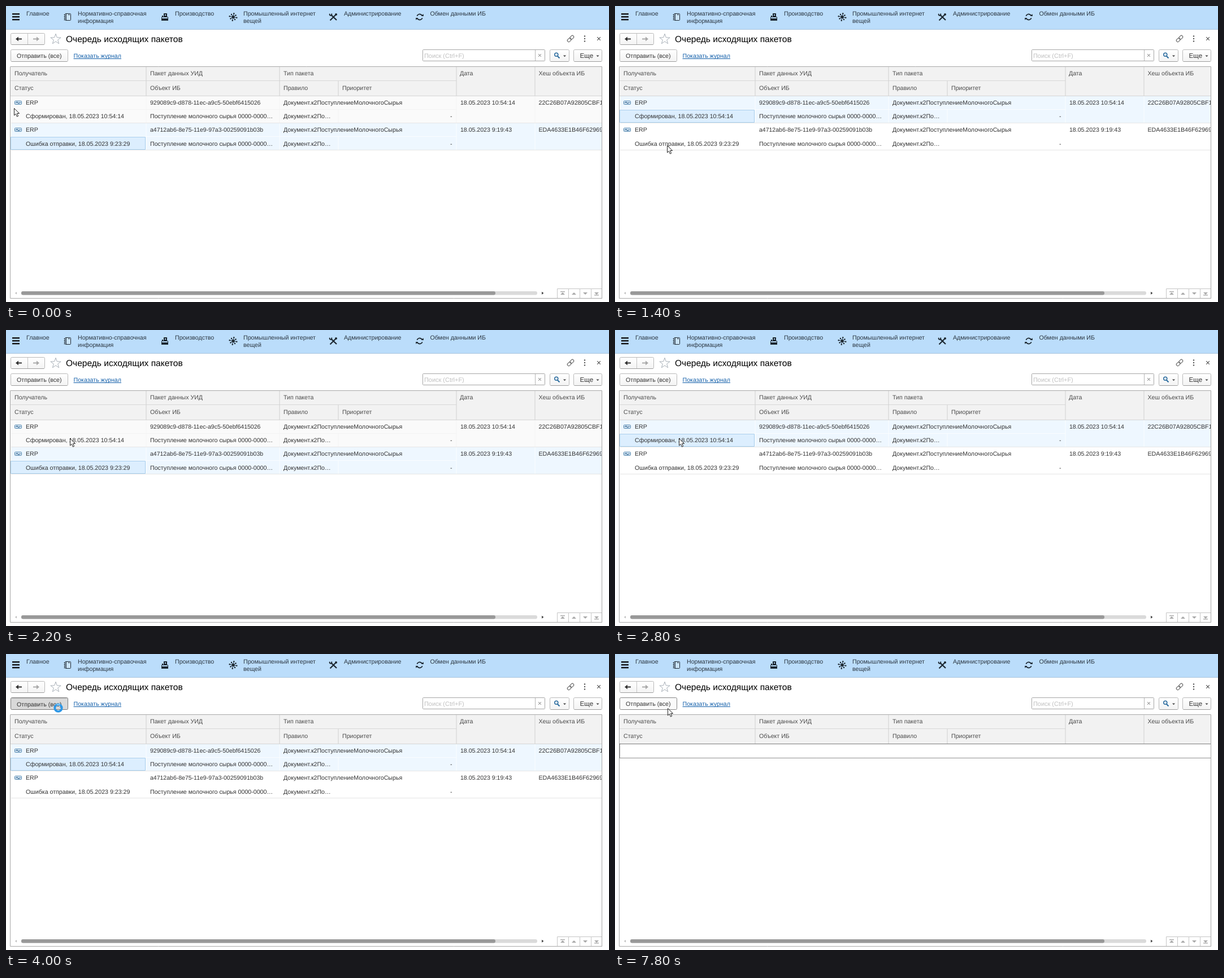
Recreate the animation shown at these times as an HTML page with a canvas. Size 1067 px wide and 525 px high, loop 8 s.

```html
<!DOCTYPE html>
<html lang="ru">
<head>
<meta charset="utf-8">
<style>
html, body { margin: 0; width: 100%; height: 100%; overflow: hidden; background: #fff; }
canvas { display: block; }
</style>
</head>
<body>
<canvas id="stage" width="1067" height="525"></canvas>
<script>
const ctx = document.getElementById('stage').getContext('2d');
const LOOP = 8000;
const SIZE = 10.63;

// time, pointer x, pointer y, selected row, button state, pointer kind, rows left
const steps = [
  [0, 14, 181, 1, 'idle', 'arrow', 2],
  [200, 20, 182, 1, 'idle', 'arrow', 2],
  [400, 48, 186, 1, 'idle', 'arrow', 2],
  [600, 51, 190, 1, 'idle', 'arrow', 2],
  [800, 51, 190, 0, 'idle', 'arrow', 2],
  [1000, 87, 242, 0, 'idle', 'arrow', 2],
  [1200, 92, 252, 0, 'idle', 'arrow', 2],
  [1400, 92, 247, 0, 'idle', 'arrow', 2],
  [1600, 92, 247, 1, 'idle', 'arrow', 2],
  [2200, 113, 192, 1, 'idle', 'arrow', 2],
  [2800, 113, 192, 0, 'idle', 'arrow', 2],
  [3200, 102, 126, 0, 'idle', 'arrow', 2],
  [3400, 93, 102, 0, 'idle', 'arrow', 2],
  [3600, 93, 97, 0, 'hover', 'arrow', 2],
  [3800, 93, 96, 0, 'pressed', 'arrow', 2],
  [4000, 92.5, 95.7, 0, 'pressed', 'busy', 2],
  [7600, 92.5, 95.7, -1, 'hover', 'busy', 1],
  [7800, 93, 96, -1, 'hover', 'arrow', 0]
];

const rows = [
  { id: '929089c9-d878-11ec-a9c5-50ebf6415026', date: '18.05.2023 10:54:14',
    hash: '22C26B07A92805CBF1', status: 'Сформирован, 18.05.2023 10:54:14' },
  { id: 'a4712ab6-8e75-11e9-97a3-00259091b03b', date: '18.05.2023 9:19:43',
    hash: 'EDA4633E1B46F62969', status: 'Ошибка отправки, 18.05.2023 9:23:29' }
];

function text(str, x, midY, color = '#333', size = SIZE) {
  ctx.font = `${size}px "Liberation Sans", Arial, sans-serif`;
  ctx.fillStyle = color;
  ctx.fillText(str, x, midY + size * 0.36);
}

function rect(x, y, w, h, color) {
  ctx.fillStyle = color;
  ctx.fillRect(x, y, w, h);
}

function path(points, color, width = 1, closed = false) {
  ctx.beginPath();
  points.forEach(([x, y]) => ctx.lineTo(x, y));
  if (closed) ctx.closePath();
  ctx.strokeStyle = color;
  ctx.lineWidth = width;
  ctx.stroke();
}

function shape(points, color) {
  ctx.beginPath();
  points.forEach(([x, y]) => ctx.lineTo(x, y));
  ctx.closePath();
  ctx.fillStyle = color;
  ctx.fill();
}

function arc(x, y, r, color, width, from = 0, to = Math.PI * 2) {
  ctx.beginPath();
  ctx.arc(x, y, r, from, to);
  ctx.strokeStyle = color;
  ctx.lineWidth = width;
  ctx.stroke();
}

function dot(x, y, r, color) {
  ctx.beginPath();
  ctx.arc(x, y, r, 0, Math.PI * 2);
  ctx.fillStyle = color;
  ctx.fill();
}

function box(x, y, w, h, fill, border, radius = 2) {
  ctx.beginPath();
  ctx.roundRect(x + 0.5, y + 0.5, w - 1, h - 1, radius);
  ctx.fillStyle = fill;
  ctx.fill();
  ctx.strokeStyle = border;
  ctx.lineWidth = 1;
  ctx.stroke();
}

function button(x, y, w, h) {
  const fill = ctx.createLinearGradient(0, y, 0, y + h);
  fill.addColorStop(0, '#fff');
  fill.addColorStop(1, '#f3f3f3');
  box(x, y, w, h, fill, '#b8b8b8');
  rect(x + 2, y + h - 1, w - 4, 1, '#9c9c9c');
}

function triangle(x, y, half, height, color) {
  shape([[x - half, y], [x + half, y], [x, y + height]], color);
}

function cross(x, y, r, color, width) {
  path([[x - r, y - r], [x + r, y + r]], color, width);
  path([[x + r, y - r], [x - r, y + r]], color, width);
}

function drawMenu() {
  rect(0, 0, 1067, 41, '#bbddfb');
  rect(0, 41, 1067, 1, '#a9c5dd');
  const ink = '#1c2730';
  [13, 18, 23].forEach(y => rect(11, y, 13, 2.4, '#111'));

  // notebook
  box(104, 13, 11, 13, '#c9e3fb', ink, 1);
  rect(106, 13, 1, 13, ink);
  rect(110, 15, 3, 1, ink);
  [15, 18, 21, 24].forEach(y => rect(102.5, y, 2.5, 1, ink));

  // machine
  box(275, 19, 12, 6, '#bbddfb', ink, 0.5);
  rect(275, 22, 12, 4, ink);
  rect(279, 13, 6, 6, ink);
  rect(281, 15, 2, 2, '#bbddfb');
  rect(276, 17, 2, 3, ink);

  // hub
  for (let i = 0; i < 8; i++) {
    const a = i * Math.PI / 4 + 0.2, r = i % 2 ? 5.4 : 6.4;
    const x = 402 + r * Math.cos(a), y = 19.5 + r * Math.sin(a);
    path([[402, 19.5], [x, y]], ink, 1);
    dot(x, y, 1.2, ink);
  }
  dot(402, 19.5, 2.5, ink);

  // tools
  path([[575, 15.5], [585, 25]], ink, 2.3);
  path([[573.5, 25.5], [583, 16]], ink, 2.1);
  arc(574.5, 15, 1.8, ink, 1.8, -0.8, 3.9);
  dot(584, 15, 2, ink);

  // exchange arrows
  arc(732, 19.5, 5, ink, 1.8, 3.5, 5.9);
  arc(732, 19.5, 5, ink, 1.8, 0.35, 2.75);
  shape([[735, 18], [739, 18], [738.5, 14]], ink);
  shape([[725, 21], [729, 21], [725.5, 25]], ink);

  [['Главное', 36, 13], ['Нормативно-справочная', 127, 13], ['информация', 127, 26.5],
   ['Производство', 299, 13], ['Промышленный интернет', 420, 13], ['вещей', 420, 26.5],
   ['Администрирование', 598, 13], ['Обмен данными ИБ', 750.5, 13]]
    .forEach(([label, x, y]) => text(label, x, y, '#2b3640'));
}

function arrowIcon(x, y, dir, color) {
  path([[x - 5 * dir, y], [x + 4 * dir, y]], color, 2);
  shape([[x + 6 * dir, y], [x + 1 * dir, y - 4], [x + 1 * dir, y + 4]], color);
}

function drawTitle() {
  button(8, 48, 61, 21);
  rect(38, 49, 1, 19, '#c4c4c4');
  arrowIcon(23, 58.5, -1, '#333');
  arrowIcon(53, 58.5, 1, '#aaa');

  const star = Array.from({ length: 10 }, (_, i) => {
    const a = -Math.PI / 2 + i * Math.PI / 5, r = i % 2 ? 3.9 : 9.6;
    return [88 + r * Math.cos(a), 59 + r * Math.sin(a)];
  });
  path(star, '#a8b0b8', 1, true);
  text('Очередь исходящих пакетов', 106, 58.5, '#000', 15.55);

  ctx.save();
  ctx.translate(999, 58);
  ctx.rotate(-Math.PI / 4);
  ctx.strokeStyle = '#666';
  ctx.lineWidth = 1.1;
  for (const x of [-7, -0.5]) {
    ctx.beginPath();
    ctx.roundRect(x, -2.5, 7.5, 5, 2.5);
    ctx.stroke();
  }
  ctx.restore();
  [53.5, 58, 62.5].forEach(y => dot(1024, y, 1.2, '#555'));
  cross(1049, 58, 2.8, '#555', 1.2);
}

function drawToolbar(state) {
  const pressed = state === 'pressed';
  if (state === 'idle') button(8, 77, 102, 22);
  else box(8, 77, 102, 22, pressed ? '#d9d9d9' : '#fafafa', pressed ? '#777' : '#858585');
  if (pressed) rect(9, 78, 100, 1, '#b8b8b8');
  text('Отправить (все)', 19, pressed ? 89 : 88, '#333');
  text('Показать журнал', 119.5, 88, '#1460aa');
  rect(119.5, 93, 84.5, 1, '#1460aa');

  box(737, 77, 217, 21, '#fff', '#a5a5a5', 1);
  rect(936, 78, 1, 19, '#b5b5b5');
  text('Поиск (Ctrl+F)', 740, 88, '#c0c0c0', 10.95);
  cross(944.5, 87.5, 2.3, '#666', 1);

  button(962, 77, 35, 22);
  path([[976, 89], [979.5, 92.5]], '#286a9e', 2);
  arc(973.8, 86.3, 3, '#286a9e', 1.5);
  triangle(988.5, 87.5, 2.5, 2.8, '#444');

  button(1004, 77, 51, 22);
  text('Еще', 1015.5, 88, '#333', 11.6);
  triangle(1047, 87.5, 2.5, 2.8, '#444');
}

function drawHeader() {
  rect(8, 107, 1047, 52, '#f2f2f2');
  rect(8, 132, 789, 1, '#d8d8d8');
  [248, 484, 797, 936].forEach(x => rect(x - 0.5, 108, 1, 51, '#d0d0d0'));
  rect(587.5, 133, 1, 26, '#d0d0d0');
  rect(8, 159, 1047, 1, '#d5d5d5');
  [['Получатель', 15, 119.5], ['Статус', 15, 145.5], ['Пакет данных УИД', 255, 119.5],
   ['Объект ИБ', 255, 145.5], ['Тип пакета', 491, 119.5], ['Правило', 491, 145.5],
   ['Приоритет', 595, 145.5], ['Дата', 803, 119.5], ['Хеш объекта ИБ', 942.5, 119.5]]
    .forEach(([label, x, y]) => text(label, x, y, '#4c4c4c'));
}

function drawRow(index, selected) {
  const row = rows[index], y = 160 + index * 48.3, top = Math.round(y);
  const fill = selected ? '#eef7ff' : index ? '#fff' : '#fafafa';
  rect(9, top, 1046, 47, fill);
  if (selected || !index) {
    const gap = selected ? '#fafdff' : '#f3f3f3';
    [248, 484, 797, 936].forEach(x => rect(x - 0.5, top, 1, 47, gap));
    rect(587.5, top + 24, 1, 23, gap);
    rect(9, top + 23, 788, 1, gap);
  }
  rect(9, top + 47, 1046, 1, '#e6e6e6');
  if (selected) box(8, top + 24, 239, 23, '#dceefe', '#a6cdec', 0);

  box(15, top + 8, 13, 7, '#e2effa', '#477ea8', 1);
  path([[17, y + 12], [19.5, y + 10.5], [22, y + 12.5], [26, y + 11]], '#285f8d', 1.2);
  const y1 = y + 11.2, y2 = y + 35.5;
  text('ERP', 35, y1);
  text(row.id, 255, y1, '#333', 10.5);
  text('Документ.к2ПоступлениеМолочногоСырья', 491, y1);
  text(row.date, 804, y1, '#333', 10.57);
  text(row.hash, 942.5, y1);
  text(row.status, 35, y2);
  text('Поступление молочного сырья 0000-0000…', 255, y2);
  text('Документ.к2По…', 491, y2);
  text('-', 786, y2);
}

function drawFocus() {
  ctx.setLineDash([1, 1]);
  path([[8.5, 159.5], [1056, 159.5], [1056, 184.5], [8.5, 184.5]], '#222', 1, true);
  ctx.setLineDash([]);
}

function drawScroll() {
  ctx.beginPath();
  ctx.roundRect(27, 506, 913, 6.5, 3);
  ctx.fillStyle = '#dadada';
  ctx.fill();
  ctx.beginPath();
  ctx.roundRect(27, 506, 839, 6.5, 3);
  ctx.fillStyle = '#999';
  ctx.fill();
  shape([[16, 509.3], [19, 507], [19, 511.6]], '#bbb');
  shape([[951.5, 509.3], [948, 506.8], [948, 511.8]], '#444');
  for (let i = 0; i < 4; i++) {
    const x = 975 + i * 20, up = i < 2, mid = x + 10;
    box(x, 501, 21, 18, '#fff', '#c6c6c6', 0);
    triangle(mid, up ? 512 : 508, 4, up ? -4 : 4, '#a8a8a8');
    if (i === 0) rect(mid - 4, 506, 8, 1.4, '#a8a8a8');
    if (i === 3) rect(mid - 4, 512, 8, 1.4, '#a8a8a8');
  }
}

function drawPointer(x, y, kind, pressed) {
  if (kind === 'busy') {
    arc(x, y, 6.2, '#2d97e6', 3.8);
    if (pressed) arc(x, y, 6.2, '#72bdf2', 3.2, -2.1, -1);
    else arc(x, y, 6.2, '#62b4f0', 3.2, 0.7, 1.9);
    return;
  }
  const outline = [[0.5, 0.5], [0.5, 13], [3.4, 10.3], [5.4, 15.2], [7.6, 14.2],
    [5.6, 9.5], [9.6, 9.5]].map(([dx, dy]) => [x + dx, y + dy]);
  shape(outline, '#fff');
  path(outline, '#222', 1, true);
}

function draw(time) {
  const [, x, y, selected, state, kind, left] = steps.findLast(step => step[0] <= time);
  rect(0, 0, 1067, 525, '#fff');
  drawMenu();
  drawTitle();
  drawToolbar(state);

  ctx.save();
  ctx.beginPath();
  ctx.rect(8, 107, 1047, 412);
  ctx.clip();
  drawHeader();
  for (let i = 2 - left; i < 2; i++) drawRow(i, selected === i);
  if (left < 2) drawFocus();
  drawScroll();
  ctx.restore();
  path([[8, 107.5], [1054.5, 107.5], [1054.5, 518.5], [7.5, 518.5], [7.5, 107.5]], '#a8a8a8');

  drawPointer(x, y, kind, state === 'pressed');
}

ctx.textRendering = 'geometricPrecision';
const start = performance.now();
function tick() {
  draw((performance.now() - start) % LOOP);
  requestAnimationFrame(tick);
}
tick();
</script>
</body>
</html>
```
